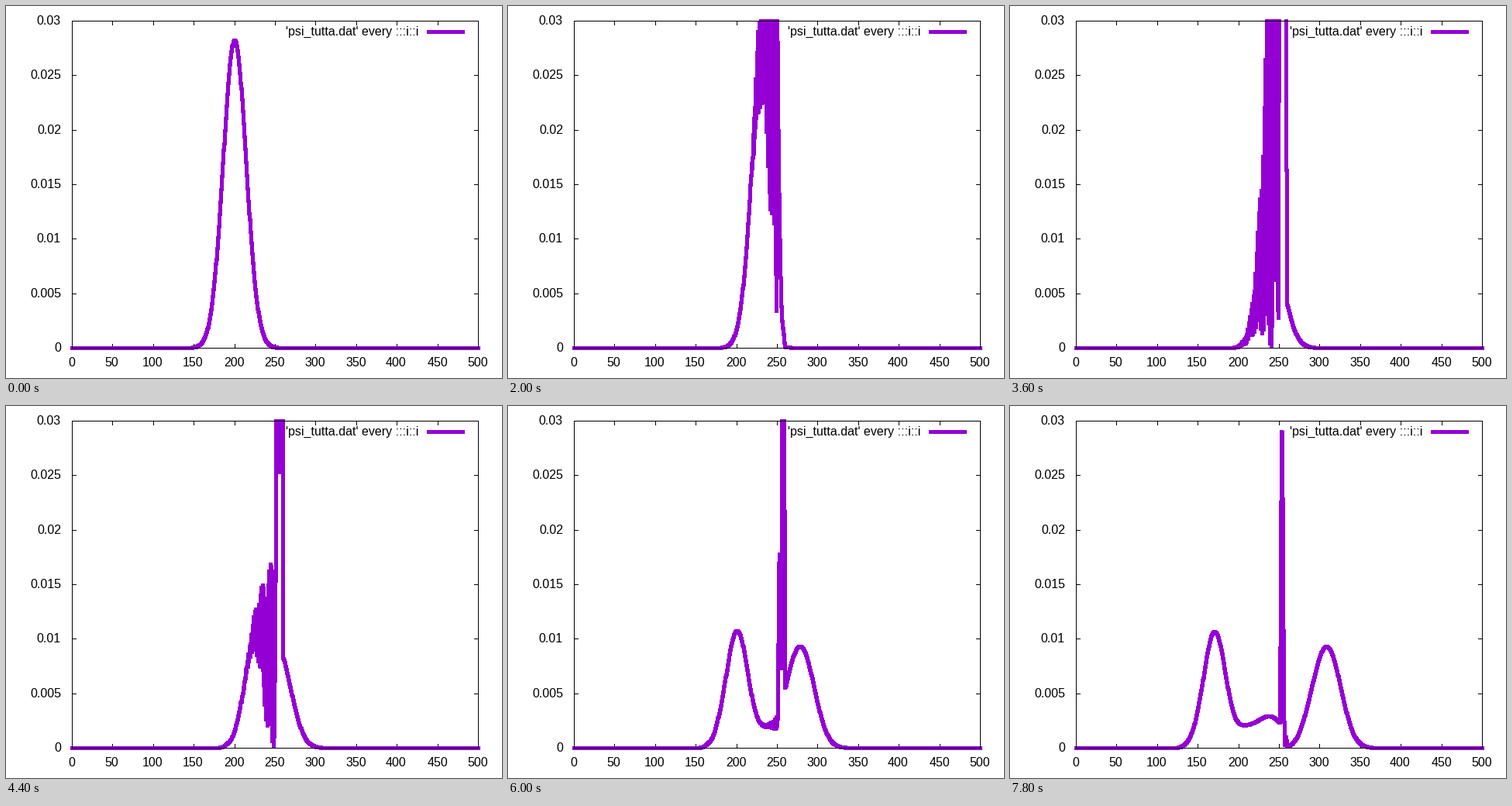
These frames come from a looping animation (640x480 px, 8000 ms). A matplotlib script:

```python
import numpy as np
import matplotlib.pyplot as plt
from matplotlib.animation import FuncAnimation
from matplotlib.patches import Rectangle

W, H = 640, 480
LEFT, RIGHT, BOTTOM, TOP = 85, 609, 38, 460   # plot box, pixels counted from bottom left
X_MAX, Y_MAX = 500, 0.03
VIOLET = (0x94, 0x00, 0xD3, 255)
PX = 0.72                                     # points per pixel at 100 dpi
FRAMES, INTERVAL = 40, 200

plt.rcParams["font.family"] = "Liberation Sans"
plt.rcParams["font.size"] = 16 * PX

# Wave packet meeting a square barrier, Crank-Nicolson in time
DX, DT, STEPS = 0.5, 0.1, 20
X0, SIGMA, Q = 200, 20, 2
V0, A, B = 1.7, 250, 260

x = np.arange(0, X_MAX + DX / 2, DX)
inner = x[1:-1]
barrier = np.where((inner > A) & (inner <= B), V0, 0.0)
hop = np.full(inner.size - 1, -0.5 / DX**2)
energy, modes = np.linalg.eigh(
    np.diag(1 / DX**2 + barrier) + np.diag(hop, 1) + np.diag(hop, -1))
packet = np.exp(-(inner - X0)**2 / (2 * SIGMA**2) + 1j * Q * inner)
packet /= np.sqrt(np.sum(np.abs(packet)**2) * DX)
weights = modes.T @ packet
turn = 2 * np.arctan(energy * DT / 2) * STEPS


def density(i):
    psi = modes @ (weights * np.exp(-1j * turn * i))
    return np.pad(np.abs(psi)**2, 1)


def map_x(v):
    return np.floor(LEFT + v * (RIGHT - LEFT) / X_MAX + 0.5).astype(int)


def map_y(v):
    return np.floor(BOTTOM + v * (TOP - BOTTOM) / Y_MAX + 0.5).astype(int)


def trace(px, py):
    """Pixels along a polyline, cut off at the top of the box."""
    dx, dy = np.diff(px), np.diff(py)
    n = np.maximum(np.maximum(abs(dx), abs(dy)), 1)
    seg = np.repeat(np.arange(n.size), n)
    t = (np.arange(n.sum()) - np.repeat(np.cumsum(n) - n, n)) / n[seg]
    xs = np.append(np.floor(px[seg] + t * dx[seg] + 0.5), px[-1]).astype(int)
    ys = np.append(np.floor(py[seg] + t * dy[seg] + 0.5), py[-1]).astype(int)
    keep = ys <= TOP
    return xs[keep], ys[keep]


def brush(xs, ys):
    """Stamp a 5 by 5 pixel square on every point."""
    img = np.zeros((H, W, 4), np.uint8)
    for ox in range(-2, 3):
        for oy in range(-2, 3):
            img[ys + oy, xs + ox] = VIOLET
    return img


fig = plt.figure(figsize=(6.4, 4.8), dpi=100, facecolor="white")
ax = fig.add_axes([0, 0, 1, 1])
ax.axis("off")


def line(xs, ys, z):
    # Snapping would push pixel centres to the next pixel
    ax.plot(xs, ys, color="black", lw=PX, antialiased=False, snap=False,
            solid_joinstyle="miter", solid_capstyle="projecting", zorder=z)


def label(px, py, text, ha):
    ax.text(px, py, text, ha=ha, va="baseline", zorder=4)


for v in range(0, 501, 50):
    c = int(map_x(v))
    line([c, c], [BOTTOM, BOTTOM + 5], 1)
    line([c, c], [TOP, TOP - 5], 1)
    label(c - 1, 14.5, str(v), "center")

for k in range(7):
    v = k * 0.005
    r = int(map_y(v))
    line([LEFT, LEFT + 5], [r, r], 1)
    line([RIGHT, RIGHT - 5], [r, r], 1)
    label(70.5, r - 4.5, f"{v:.3g}", "right")

curve = ax.imshow(np.zeros((H, W, 4), np.uint8), origin="lower", aspect="auto",
                  extent=(-0.5, W - 0.5, -0.5, H - 0.5),
                  interpolation="nearest", zorder=2)
line([LEFT, RIGHT, RIGHT, LEFT, LEFT], [BOTTOM, BOTTOM, TOP, TOP, BOTTOM], 3)
label(532, 441.5, "'psi_tutta.dat' every :::i::i", "right")
ax.add_patch(Rectangle((542.5, 443.5), 49, 5, color="#9400D3", lw=0,
                       antialiased=False, zorder=4))
ax.set_xlim(-0.5, W - 0.5)
ax.set_ylim(-0.5, H - 0.5)

cols = map_x(x)


def update(i):
    curve.set_data(brush(*trace(cols, map_y(density(i)))))
    return [curve]


anim = FuncAnimation(fig, update, frames=FRAMES, interval=INTERVAL,
                     repeat=True, repeat_delay=0, blit=False)
plt.show()
```
